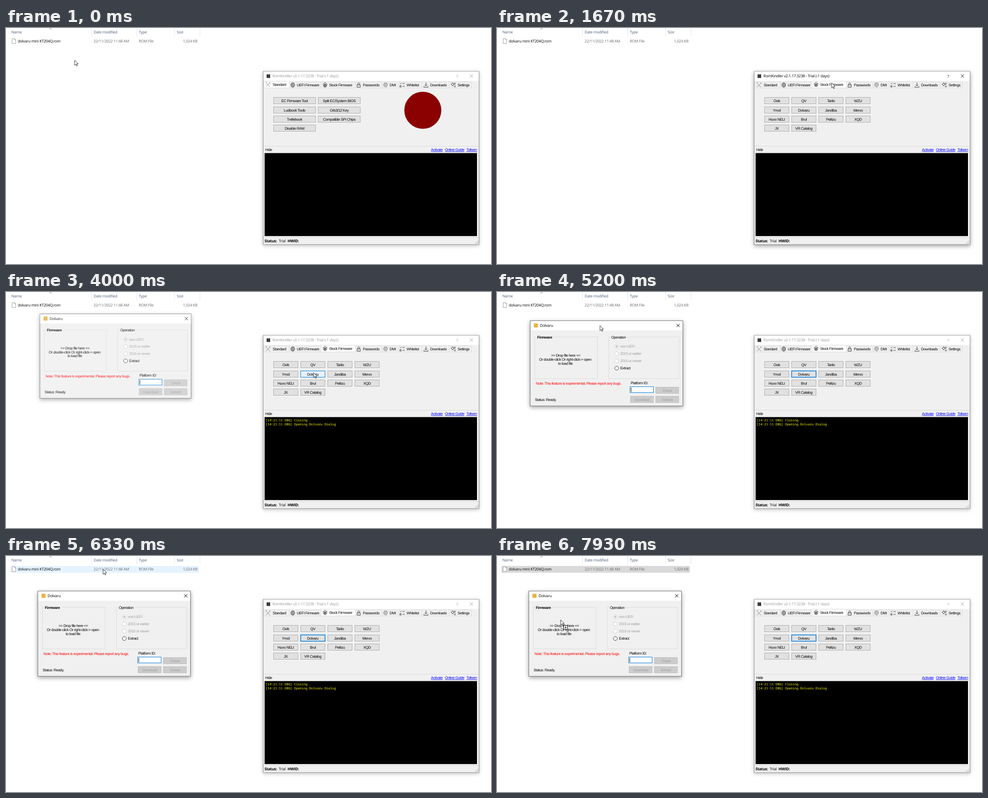
These frames come from a looping animation (1074 px wide and 522 px high, 8 s). An HTML page:

```html
<!DOCTYPE html>
<html lang="en">
<head>
<meta charset="utf-8">
<title>Firmware tool</title>
<style>
html, body { margin: 0; width: 100%; height: 100%; overflow: hidden; background: #fff; }
svg { display: block; width: 1074px; height: 522px; }
text { font: 8.2px "Liberation Sans", Arial, sans-serif; letter-spacing: -.05em; white-space: pre; text-rendering: geometricPrecision; }
.ui { font: 8.5px "Open Sans", "Noto Sans", sans-serif; letter-spacing: -.035em; }
.bold { font-weight: 700; }
.log { font: 7px "Noto Sans Mono", "DejaVu Sans Mono", monospace; letter-spacing: 0; }
.mid { text-anchor: middle; }
.end { text-anchor: end; }
.link { text-decoration: underline; }
.ico { fill: none; stroke: #222; stroke-width: 1; }
.deep { filter: drop-shadow(0 3px 5px rgba(0,0,0,.38)); }
.soft { filter: drop-shadow(0 2px 4px rgba(0,0,0,.25)); }
</style>
</head>
<body>
<svg id="stage" viewBox="0 0 1074 522" xmlns="http://www.w3.org/2000/svg"></svg>
<script>
const PERIOD = 8000;
const BLUE = '#0078d7';
const MAKER = 'Dolvaru';

// Markup helpers
const text = (x, y, s, cls = '', fill = '#000', id = '') =>
  `<text x="${x}" y="${y}" class="${cls}" fill="${fill}"${id && ` id="${id}"`}>${s.replace(/</g, '&lt;')}</text>`;
const rect = (x, y, w, h, fill, stroke = 'none', id = '', extra = '') =>
  `<rect x="${x}" y="${y}" width="${w}" height="${h}" fill="${fill}" stroke="${stroke}"${id && ` id="${id}"`} ${extra}/>`;
const path = (d, extra = 'class="ico"') => `<path d="${d}" ${extra}/>`;
const line = (d, stroke) => path(d, `fill="none" stroke="${stroke}"`);
const group = (id, body, extra = '') => `<g id="${id}" ${extra}>${body}</g>`;
const button = (x, y, w, label, id = '') =>
  rect(x, y, w, 14, '#e1e1e1', '#adadad', id) + text(x + w / 2, y + 10.2, label, 'mid');
const cross = (x, y, r) => `M${x - r} ${y - r}l${2 * r} ${2 * r}M${x + r} ${y - r}l${-2 * r} ${2 * r}`;

function explorer() {
  const seps = [189.5, 289.5, 373.5, 429.5].map(x => `M${x} 0V18`).join('');
  const heads = [[12, 'Name'], [194, 'Date modified'], [294, 'Type'], [378, 'Size']];
  return rect(10, 22, 417, 15, 'none', 'none', 'row')
    + line(seps, '#e3e3e3')
    + line('M96 3L98.7 .5 101.4 3', '#777')
    + heads.map(([x, s]) => text(x, 12, s, 'ui', '#4c607a')).join('')
    + path('M13.5 23.5H19L21.5 26V34.5H13.5ZM19 23.5V26H21.5', 'fill="#fff" stroke="#8a8a8a" stroke-width=".8"')
    + text(26, 32, 'dolvaru mini KT204Q.rom', 'ui')
    + text(194, 32, '22/11/2022 11:48 AM', 'ui', '#6d6d6d')
    + text(294, 32, 'ROM File', 'ui', '#6d6d6d')
    + text(424, 32, '1,024 KB', 'ui end', '#6d6d6d');
}

// left edge, label x, label, icon x, icon path (11 by 11 box)
const TABS = [
  [571, 590.5, 'Standard', 575, 'M1 2L9.5 10.5M10 1L1 10M0 0L3 1M8 1L11 3'],
  [627, 644, 'UEFI Firmware', 630, 'M2 2H8V9H2ZM4 4.5H6V6.5H4ZM0 4H2M0 7H2M8 4H10M8 7H10M4 0V2M6 0V2M4 9V11M6 9V11'],
  [697, 715.5, 'Stock Firmware', 701, 'M0 5L5.5 0 11 5M3 4H8V9H3ZM4.5 5.5H6.5V7.5H4.5ZM1 7H3M8 7H10M4 9V11M7 9V11'],
  [773, 790.5, 'Passwords', 776, 'M1.5 5H8.5V10.5H1.5ZM3 5V2.5Q5 -1 7 2.5V5M5 7V8.5'],
  [832, 849.5, 'DMI', 835, 'M2 9Q0 1 5.5 1T9.5 8M4 10Q2 3 5.5 3T7.5 10M5.5 5V11M1 4Q5 -2 10 4'],
  [868, 887, 'Whitelist', 872, 'M0 2L1.5 3.5 4 1M0 7H3V10H0ZM6 2.5H11M6 8.5H11'],
  [920, 939, 'Downloads', 925, 'M5 0V7M2 4.5L5 7.5 8 4.5M.5 8V10.5H9.5V8'],
  [981, 1000, 'Settings', 985, 'M4 1.5A2.5 2.5 0 1 1 3.9 1.5M4 0V1.5M4 6.5V8M0 4H1.5M6.5 4H8M9 1A1.5 1.5 0 1 1 8.9 1M9 7A1.5 1.5 0 1 1 8.9 7'],
];

function tabs() {
  return TABS.map(([x, tx, name, ix, d], i) => {
    const w = (TABS[i + 1] || [1030])[0] - x;
    const pale = i === 0 || i === 4 ? '#777' : '#222';
    return rect(x + .5, 119.5, w, 13, '#f0f0f0', '#dcdcdc', 'tab' + i)
      + group('lab' + i, text(tx, 129, name)
        + path(d, `class="ico" style="stroke:${pale};stroke-width:.9" transform="translate(${ix} 120.5)"`));
  }).join('');
}

const ROWS = [153.5, 174.5, 194.5, 214.5];
const STANDARD = [
  ['EC Firmware Tool', 'Ludbook Tools', 'Trellebook', 'Disable RAM'],
  ['Split EC/System BIOS', 'Orb3/12 Key', 'Compatible SPI Chips'],
];
const STOCK = [
  ['Ovik', 'Ymol', 'Huvo NELI', 'JX'],
  ['QV', MAKER, 'Brul', 'VR Catalog'],
  ['Tarilo', 'Jandiba', 'Pelitzu'],
  ['WZU', 'Mervo', 'XQD'],
];
const grid = (cols, step, w) => cols.map((col, c) => col.map((s, r) =>
  button(592.5 + c * step, ROWS[r], w, s, s === MAKER ? 'maker' : '')).join('')).join('');

function mainWindow() {
  let grip = '';
  for (let r = 0; r < 3; r++) for (let c = 0; c <= r; c++)
    grip += rect(1044 - c * 2.8, 470.5 + r * 2.6, 1.4, 1.4, '#aaa');
  return rect(569.5, 96, 478, 383, '#f0f0f0', '#8c8c8c', 'frame')
    + rect(570, 96.5, 477, 20.5, '#fff')
    + rect(577, 102.5, 8, 8, '#3c3c3c')
    + group('caption', text(590, 109.3, 'RomKindler v2.1.17.3238 - Trial (-1 days)', 'ui', 'currentColor')
      + text(999, 109.5, '?', 'ui mid', 'currentColor')
      + path(cross(1030.7, 106, 3.6), 'stroke="currentColor" stroke-width=".9"'))
    + tabs()
    + group('standard', grid(STANDARD, 99, 93)
      + '<circle cx="923" cy="182" r="41" fill="#8b0000"/>')
    + group('stock', grid(STOCK, 60, 54))
    + line('M570 261.5H1047', '#dcdcdc')
    + text(574, 272, 'Hide')
    + text(941, 272, 'Activate', 'link', '#00f')
    + text(972, 272, 'Online Guide', 'link', '#00f')
    + text(1043, 272, 'Tolkern', 'link end', '#00f')
    + rect(573, 277, 470, 183.5, '#000')
    + line('M572.5 461V276.5H1043', '#a0a0a0') + line('M573 461H1043.5V277', '#fff')
    + group('log', text(575, 285.5, '[14:21:11 DBG] Closing .', 'log', '#ff0')
      + text(575, 294.5, `[14:21:11 DBG] Opening ${MAKER} Dialog`, 'log', '#ff0'))
    + line('M570 463.5H1047', '#d9d9d9')
    + text(572.5, 474.3, 'Status:', 'ui bold') + text(604, 474.3, 'Trial', 'ui')
    + text(623.5, 474.3, 'HWID:', 'ui bold') + grip;
}

function tooltip() {
  return rect(693, 193.5, 293, 13.5, '#000', 'none', '', 'opacity=".35"')
    + rect(691, 191.5, 293, 13.5, '#fff', '#767676')
    + text(694.5, 201, `Download and extract firmware from ${MAKER} Website. Works for old model.`, 'ui', '#575757');
}

// Drawn around its own top left corner
function dialog() {
  const off = (x, y, s) => rect(x, y, 51, 14, '#cccccc', '#bfbfbf')
    + text(x + 25.7, y + 10.2, s, 'mid', '#a0a0a0');
  const box = (x, w, s, cls, gap) => rect(x + .5, 36.5, w, 92, 'none', '#dcdcdc')
    + rect(x + 4, 35, gap, 4, '#f0f0f0') + text(x + 6, 39.7, s, cls);
  const radio = (s, i) => {
    const y = 57.5 + 16 * i, on = i === 3;
    return `<circle cx="192" cy="${y}" r="4.3" fill="#fff" stroke="${on ? '#222' : '#c4c4c4'}" stroke-width=".9"/>`
      + (i ? '' : `<circle cx="192" cy="${y}" r="2.3" fill="#c0c0c0"/>`)
      + text(200, y + 2.7, s, '', on ? '#000' : '#a0a0a0');
  };
  return rect(.5, .5, 338, 188.5, '#f0f0f0', '#707070', 'dlgFrame')
    + rect(1, 1, 337, 21, '#fff')
    + rect(8.5, 6.5, 9, 9, '#e8b440')
    + group('dlgCaption', text(22, 14.4, MAKER, 'ui', 'currentColor')
      + path(cross(328, 11, 3.6), 'stroke="currentColor"'))
    + box(10, 139, 'Firmware', 'bold', 38) + box(174, 155.5, 'Operation', '', 36)
    + text(79, 79.5, '>> Drop file here <<', 'mid')
    + text(78, 88.5, 'Or double-click Or right-click-> open', 'mid')
    + text(78.5, 97.5, 'to load file', 'mid')
    + ['non-UEFI', '2015 or earlier', '2016 or newer', 'Extract'].map(radio).join('')
    + text(13, 142, 'Note: This feature is experimental. Please report any bugs.', '', '#f00')
    + text(223, 140.5, 'Platform ID:')
    + rect(221.5, 146.5, 52, 13, '#fff', BLUE)
    + rect(223.5, 148.5, 1, 9.5, '#000', 'none', 'caret')
    + off(278.5, 147.5, 'Check') + off(222.5, 167.5, 'Download') + off(278.5, 167.5, 'Extract')
    + text(11, 177.8, 'Status: Ready.');
}

const arrow = path('M0 .5V11.4L2.6 9 4.3 13 6.1 12.2 4.4 8.3H8Z',
  'fill="#fff" stroke="#000" stroke-width=".8" stroke-linejoin="round"')
  + group('badge', rect(6.5, 12.5, 8.5, 8.5, '#fff', '#000') + path('M8.5 16.75H13M10.75 14.5V19', 'stroke="#000"'));

document.getElementById('stage').innerHTML = explorer() + group('main', mainWindow())
  + group('dialog', dialog()) + group('tip', tooltip()) + group('cursor', arrow);

const el = {};
document.querySelectorAll('[id]').forEach(e => el[e.id] = e);

// Pointer and dialog paths: time, x, y
const POINTER = [
  [0, 152, 71], [410, 152, 71], [1270, 752, 119], [1400, 741, 121], [2150, 741, 121],
  [2730, 689, 179], [3410, 689, 179], [3470, 681, 178], [4030, 681, 178], [4470, 322, 52],
  [4930, 228, 58], [5030, 228, 58], [5200, 228, 74], [5400, 225, 88], [5480, 225, 88],
  [5850, 120, 34], [6010, 42, 30], [6330, 215, 29], [6680, 215, 29], [7330, 102, 29],
  [7490, 102, 29], [7930, 141, 141], [PERIOD, 141, 141],
];
const DRAG = [[0, 73, 47], [5030, 73, 47], [5200, 73, 63], [5400, 70, 77], [PERIOD, 70, 77]];

function follow(track, t) {
  const i = track.findIndex(k => k[0] > t);
  const [a, b] = [track[i - 1], track[i]];
  const p = (t - a[0]) / (b[0] - a[0]);
  const e = p * p * (3 - 2 * p);
  return [a[1] + (b[1] - a[1]) * e, a[2] + (b[2] - a[2]) * e];
}

const clamp = v => Math.max(0, Math.min(1, v));
const show = (e, on) => e.setAttribute('display', on ? 'inline' : 'none');
const paint = (e, fill, stroke, width = 1) => {
  e.setAttribute('fill', fill);
  e.setAttribute('stroke', stroke);
  e.setAttribute('stroke-width', width);
};

function setTab(i, on, hover) {
  const r = el['tab' + i];
  paint(r, on ? '#fff' : hover ? '#d8eaf9' : '#f0f0f0', '#dcdcdc');
  r.setAttribute('y', on ? 117.5 : 119.5);
  r.setAttribute('height', on ? 15 : 13);
  el['lab' + i].setAttribute('transform', `translate(0 ${on ? -1.1 : 0})`);
}

function draw(t) {
  const [x, y] = follow(POINTER, t);
  const stock = t >= 1660;
  const active = t >= 1600 && t < 3920;
  el.cursor.setAttribute('transform', `translate(${Math.round(x)} ${Math.round(y)})`);

  el.frame.setAttribute('class', active ? 'deep' : 'soft');
  el.caption.setAttribute('color', active ? '#000' : '#999');
  setTab(0, !stock);
  setTab(2, stock, t >= 1330);
  show(el.standard, !stock);
  show(el.stock, stock);
  show(el.log, t >= 3920);

  const over = stock && x > 652 && x < 707 && y > 173 && y < 189;
  const pressed = t >= 3640 && t < 3760;
  if (over) paint(el.maker, pressed ? '#cce4f7' : '#e5f1fb', BLUE);
  else if (t > 3640) paint(el.maker, '#e1e1e1', BLUE, 1.6);
  else paint(el.maker, '#e1e1e1', '#adadad');

  show(el.tip, t >= 2910 && t < 3640);
  el.tip.setAttribute('opacity', clamp((t - 2880) / 320));

  // The dialog grows in, is dragged, then loses and regains focus
  const q = (1 - clamp((t - 3920) / 150)) ** 2;
  const s = 1 - .045 * q;
  const [dx, dy] = follow(DRAG, t).map(Math.round);
  const inside = t > 7500 && y > 77;
  const focused = t < 7500 || inside;
  show(el.dialog, t >= 3920);
  el.dialog.setAttribute('opacity', 1 - .8 * q);
  el.dialog.setAttribute('transform', `translate(${dx + 169.5 * (1 - s)} ${dy + 94.5 * (1 - s)}) scale(${s})`);
  el.dlgFrame.setAttribute('class', focused ? 'deep' : 'soft');
  el.dlgCaption.setAttribute('color', focused ? '#000' : '#999');
  show(el.caret, inside || focused && Math.floor((t - 3880) / 530) % 2 === 0);
  show(el.badge, inside);

  paint(el.row, inside ? '#d9d9d9' : t > 7500 ? '#cce8ff' : t > 5800 ? '#e5f3ff' : 'none', 'none');
}

function tick() {
  draw(performance.now() % PERIOD);
  requestAnimationFrame(tick);
}
tick();
</script>
</body>
</html>
```
